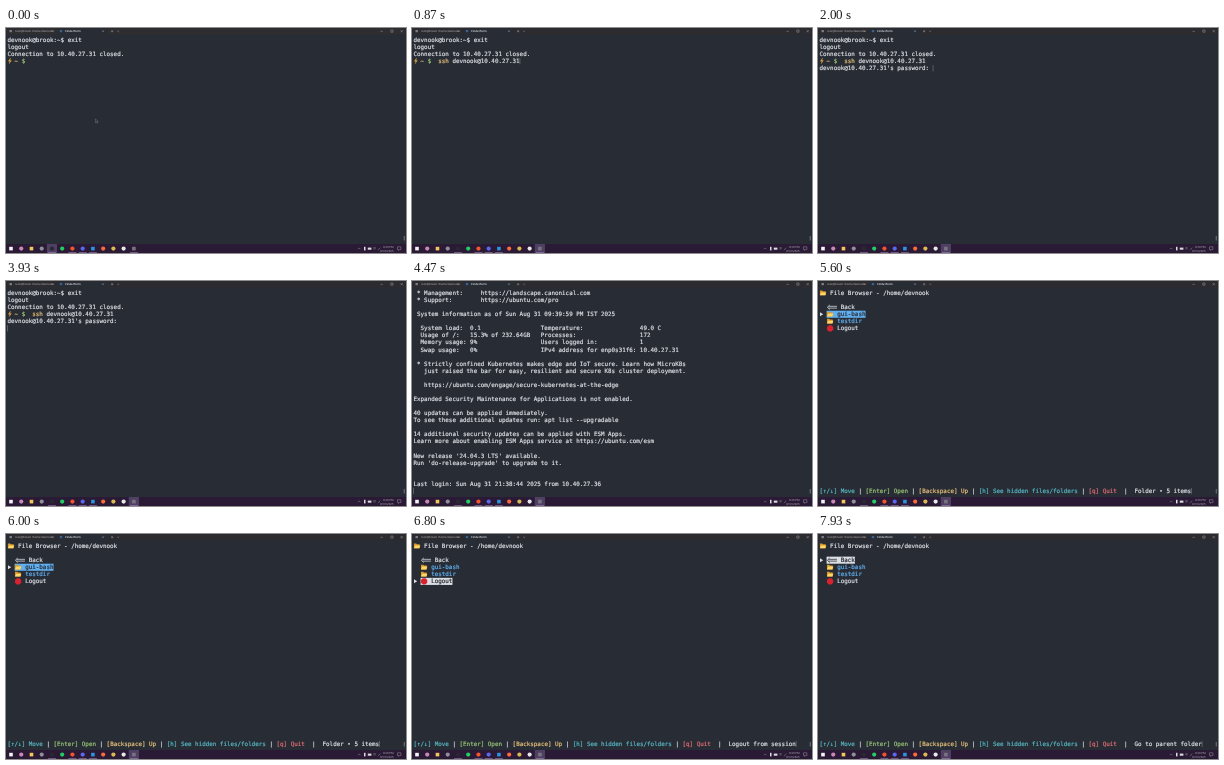
Animation, 400 px wide and 225 px high, one loop 8 s. Source, as an HTML page:

```html
<!DOCTYPE html>
<html lang="en">
<head>
<meta charset="utf-8">
<title>Terminal session</title>
<style>
  html, body { margin: 0; width: 100%; height: 100%; overflow: hidden; background: #282c34; }
  svg { display: block; width: 100vw; height: 100vh; }
  text { white-space: pre; text-rendering: geometricPrecision; fill: currentColor; }
  #term text { font: 5.88px "DejaVu Sans Mono", monospace; stroke: currentColor; stroke-width: .2; }
  .ui { font: 2.8px "Open Sans", sans-serif; color: #bdbdc4; }
  .ui.active { font-weight: 600; color: #f0f0f4; }
</style>
</head>
<body>
<svg viewBox="0 0 400 225" preserveAspectRatio="none">
  <rect width="400" height="225" fill="#282c34"/>
  <g id="bar"></g>
  <g id="term"></g>
  <rect x="397.8" y="208" width=".8" height="4.5" fill="#85888f"/>
  <path id="pointer" d="M89.4 90.8v3.9l1-.9.7 1.5.6-.3-.7-1.4h1.2z" fill="#282c34" stroke="#8b8e95" stroke-width=".4"/>
  <g id="tasks"></g>
</svg>
<script>
const LOOP = 8000, CW = 3.54, LH = 7.07, X0 = 1.5, Y0 = 8.5;
const C = { fg: '#dcdfe4', bg: '#282c34', blue: '#61afef', cyan: '#56b6c2', green: '#98c379',
            yellow: '#e5c07b', red: '#e06c75', orange: '#dba544', ui: '#b4b4bb' };
const USER = 'devnook', HOST = '10.40.27.31', CLIENT = '10.40.27.36', BOX = 'brook';
const $ = id => document.getElementById(id);
const colX = c => X0 + c * CW;
const rowY = r => Y0 + r * LH;

const rect = (x, y, w, h, fill, extra = '') =>
  `<rect x="${x}" y="${y}" width="${w}" height="${h}" fill="${fill}" ${extra}/>`;
const line = (d, stroke = C.ui, w = .4) =>
  `<path d="${d}" fill="none" stroke="${stroke}" stroke-width="${w}"/>`;
const dot = (x, y, r, fill) => `<circle cx="${x}" cy="${y}" r="${r}" fill="${fill}"/>`;
const label = (x, y, s, { anchor = 'start', active = false } = {}) =>
  `<text class="ui${active ? ' active' : ''}" x="${x}" y="${y}" text-anchor="${anchor}">${s}</text>`;
const put = (r, c, s, color = C.fg) =>
  `<text x="${colX(c)}" y="${rowY(r) + 5.5}" color="${color}">${s}</text>`;
const cursor = (r, c) => rect(colX(c), rowY(r) + .4, .5, 6.2, '#8b9097');
const cross = (x, y, s) => line(`M${x - s} ${y - s}l${2 * s} ${2 * s}m0 ${-2 * s}l${-2 * s} ${2 * s}`);

const folder = (r, c) => {
  const x = colX(c) + .4, y = rowY(r) + 1;
  return `<path d="M${x} ${y}h2.3l.7.8h2.8v4h-5.8z" fill="#d99a2b"/>` +
    `<path d="M${x} ${y + 4.8}l1.2-2.9h5.2l-1.1 2.9z" fill="#ffd668"/>`;
};
const stop = r => {
  const x = colX(3), y = rowY(r) + 3.5, a = 3.1, b = 1.3;
  return `<path d="M${x - b} ${y - a}h${2 * b}l${a - b} ${a - b}v${2 * b}l${b - a} ${a - b}h${-2 * b}l${b - a} ${b - a}v${-2 * b}z" fill="#d8232f"/>`;
};
const backArrow = (r, fill) => {
  const x = colX(2) + .4, y = rowY(r) + 3.6;
  return line(`M${x + 2.8} ${y - 2.3}L${x + .4} ${y}l2.4 2.3M${x + 1.5} ${y - .9}h8.5m-8.5 1.8h8.5`, fill, .75);
};

function titleBar(focused) {
  const strip = focused ? '#2c2c30' : '#2e2e30';
  return rect(0, 0, 400, 6.5, strip) + rect(51, .8, 51, 5.7, C.bg, 'rx="1"') +
    rect(3.5, 2, 2.4, 2.2, '#77808c') + label(9, 4.2, `root@${BOX}: /home/${USER}`) + cross(47, 3.2, .8) +
    rect(53.8, 2, 2.4, 2.2, '#3b628f') + label(59, 4.2, 'CinderTerm', { active: true }) + cross(97, 3.2, .8) +
    line('M104.9 3.2h2.4M106.1 2v2.4M111.2 2.8l1 .9 1-.9M374.5 3.3h2.4M384.8 2h2.2v2.2h-2.2z') +
    cross(395.7, 3.2, 1.1);
}

function taskBar(focused) {
  const icons = ['#f4f4f8', '#c887b5', '#f2c65a', '#8d8f99', '#2a2830', '#1fcf62', '#f2552c',
                 '#5968ef', '#2b94dc', '#fa6b38', '#d9ba50', '#e6e8ea', '#77747f'];
  const squares = [0, 2, 8, 12], running = [4, 6, 7, 8, 12];
  const iconX = i => 5 + i * 10.24;
  let s = rect(0, 216, 400, 9, '#2a1a35') +
    rect(iconX(focused ? 12 : 4) - 5.1, 216, 10.2, 9, '#4f3f63');
  icons.forEach((fill, i) => {
    const x = iconX(i);
    s += squares.includes(i) ? rect(x - 1.8, 218.8, 3.6, 3.6, fill) : dot(x, 220.6, 2.1, fill);
    if (running.includes(i)) s += rect(x - 4, 224.4, 8, .6, '#a07fbd');
  });
  return s + line('M351.9 221.2l1.3-1.3 1.3 1.3') + rect(358, 218.8, 1.5, 3.6, '#dcdce2') +
    rect(361.8, 219.6, 3.6, 2.1, '#dcdce2') +
    line('M367 220.2q1.5-1.2 3 0m-2.3 1q.8-.7 1.6 0M372 222.2l2.2-2.6') +
    label(387.5, 219.9, '9:39 PM', { anchor: 'end' }) + label(387.5, 223.8, '8/31/2025', { anchor: 'end' }) +
    line('M391.5 218.8h3.4v2.7h-1.2l-1 1v-1h-1.2z');
}

function shell(t) {
  let s = put(0, 0, `${USER}@${BOX}:~$ exit`) + put(1, 0, 'logout') +
    put(2, 0, `Connection to ${HOST} closed.`) +
    `<path d="M4.5 30l-2.2 3.3h1.5l-.6 2.5 2.2-3.3H4z" fill="${C.orange}" stroke="${C.orange}" stroke-width=".3"/>` +
    put(3, 2, '~', C.yellow) + put(3, 4, '$', C.green);
  if (t >= 530) s += put(3, 7, 'ssh', C.yellow) + put(3, 11, `${USER}@${HOST}`);
  if (t >= 1530) s += put(4, 0, `${USER}@${HOST}'s password:`);
  if (t < 130) return s;
  const at = t < 530 ? [3, 7] : t < 1330 ? [3, 30] : t < 1530 ? [4, 0] : t < 3870 ? [4, 32] : [5, 0];
  return s + cursor(...at);
}

const pair = (a, b, c, d) => '  ' + a.padEnd(14) + b.padEnd(20) + c.padEnd(28) + d;
const motd = [
  ' * Management:     https://landscape.canonical.com',
  ' * Support:        https://ubuntu.com/pro', '',
  ' System information as of Sun Aug 31 09:39:59 PM IST 2025', '',
  pair('System load:', '0.1', 'Temperature:', '49.0 C'),
  pair('Usage of /:', '15.3% of 232.64GB', 'Processes:', '172'),
  pair('Memory usage:', '9%', 'Users logged in:', '1'),
  pair('Swap usage:', '0%', 'IPv4 address for enp0s31f6:', HOST), '',
  ' * Strictly confined Kubernetes makes edge and IoT secure. Learn how MicroK8s',
  '   just raised the bar for easy, resilient and secure K8s cluster deployment.', '',
  '   https://ubuntu.com/engage/secure-kubernetes-at-the-edge', '',
  'Expanded Security Maintenance for Applications is not enabled.', '',
  '40 updates can be applied immediately.',
  'To see these additional updates run: apt list --upgradable', '',
  '14 additional security updates can be applied with ESM Apps.',
  'Learn more about enabling ESM Apps service at https://ubuntu.com/esm', '',
  "New release '24.04.3 LTS' available.",
  "Run 'do-release-upgrade' to upgrade to it.", '', '',
  `Last login: Sun Aug 31 21:38:44 2025 from ${CLIENT}`
];
const welcome = () => motd.map((s, r) => put(r, 0, s)).join('') + cursor(28, 0);

const items = [
  { name: 'Back', col: 6, fill: C.fg, note: 'Go to parent folder' },
  { name: 'gui-bash', col: 5, fill: C.blue, note: 'Folder • 5 items' },
  { name: 'testdir', col: 5, fill: C.blue, note: 'Folder • 2 items' },
  { name: 'Logout', col: 5, fill: C.fg, note: 'Logout from session' }
];
const keys = [
  [0, '[↑/↓] Move', C.cyan], [13, '[Enter] Open', C.green], [28, '[Backspace] Up', C.yellow],
  [45, '[h] See hidden files/folders', C.cyan], [76, '[q] Quit', C.red]
];

function browser(sel) {
  let s = folder(0, 0) + put(0, 3, `File Browser - /home/${USER}`);
  items.forEach((it, i) => {
    const r = i + 2, on = i === sel, ink = on ? C.bg : it.fill;
    if (on) {
      const y = rowY(r);
      s += rect(colX(2), y, (it.col + it.name.length - 2) * CW, LH, it.fill) +
        `<path d="M2 ${y + 1.5}l3.2 2-3.2 2z" fill="${C.fg}"/>`;
    }
    s += i === 0 ? backArrow(r, ink) : i === 3 ? stop(r) : folder(r, 2);
    s += put(r, it.col, it.name, ink);
  });
  for (const [c, text, fill] of keys) s += put(28, c, text, fill);
  for (const c of [11, 26, 43, 74, 86]) s += put(28, c, '|');
  const { note } = items[sel];
  return s + put(28, 89, note) + cursor(28, 89 + note.length);
}

// Each entry starts a new screen at the given time.
const scenes = [
  ...[0, 130, 530, 1330, 1530, 3870].map(t => [t, () => shell(t)]),
  [4400, welcome],
  [4700, () => browser(0)], [5270, () => browser(1)], [6070, () => browser(2)],
  [6500, () => browser(3)], [7270, () => browser(0)]
];

let shown = -1;
function draw(t) {
  const i = scenes.findLastIndex(([start]) => t >= start);
  if (i === shown) return;
  shown = i;
  const focused = t >= 130;
  $('bar').innerHTML = titleBar(focused);
  $('tasks').innerHTML = taskBar(focused);
  $('term').innerHTML = scenes[i][1]();
  $('pointer').style.display = t < 530 ? '' : 'none';
}

const began = performance.now();
function tick() {
  draw((performance.now() - began) % LOOP);
  requestAnimationFrame(tick);
}
tick();
</script>
</body>
</html>
```
